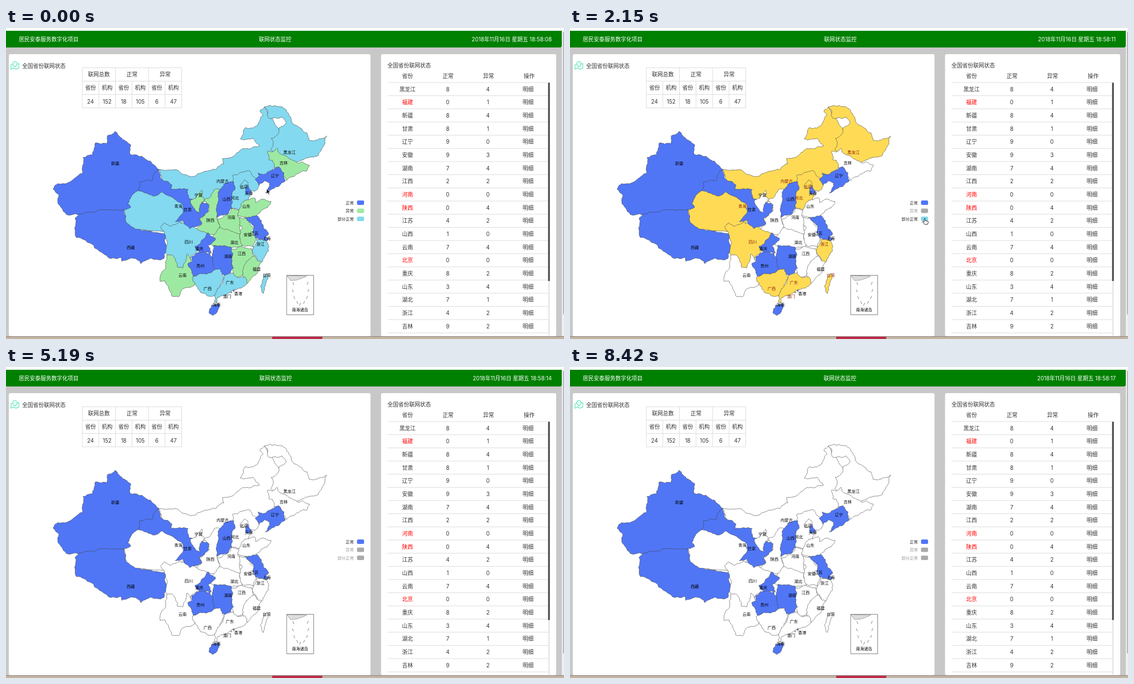
These frames come from a looping animation (1002x559 px, 8.52 s). An HTML page:

```html
<!DOCTYPE html>
<html lang="zh-CN">
<head>
<meta charset="utf-8">
<style>
html, body { margin: 0; width: 100%; height: 100%; overflow: hidden; background: #fff; }
body { position: relative; font: 9.75px Inter, "Noto Sans CJK SC", "Noto Sans CJK", sans-serif; }
svg { position: absolute; left: 0; top: 0; }
header { position: absolute; left: 0; top: 4.5px; width: 998px; height: 30px; padding: 0 18px 0 23px;
  box-sizing: border-box; display: flex; justify-content: space-between; align-items: center;
  color: #fff; background: #008000; border-radius: 0 0 3px 0; white-space: pre; }
</style>
</head>
<body>
<header><span>居民安泰服务数字化项目</span><span>联网状态监控</span><span id="clock"></span></header>
<svg id="stage" width="1002" height="559"></svg>
<script>
const NS = 'http://www.w3.org/2000/svg', stage = document.getElementById('stage');
const clock = document.getElementById('clock');
const LOOP = 8520, COLORS = ['#5076f6', '#9ee9a2', '#83d9ef'], YELLOW = '#ffdb55';

// Name, status, label place, then key points in degrees. Later shapes cover
// earlier ones, so each shared border is described once.
const provinces = `内蒙古 2 389,275 97.2,42.8 101.8,42.5 105,41.6 107.4,42.4 110.1,42.7 111.9,43.7 111.6,44.6 113.6,44.8 116.2,46.3 119.9,46.7 118.5,48 115.6,47.9 116.7,49.8 119.2,50.1 120.7,51.9 120,52.6 121,53.3 125,48.5 124,43.6 120.5,41 116.5,40.7 113.2,39.5 107.6,37.4 104.6,37.4 99,39.9
黑龙江 2 509,223 121.7,52.8 121,53.3 123.5,53.5 125.6,53 127.3,50.6 130.6,48.9 131,47.7 132.5,47.7 135,48.4 133.1,45.1 131,44.8 128,43.8 122.4,46.1 123,47 122.5,48 124.1,48.8 124.3,49.8 125.9,50.6 125,51.6 122,51.4
吉林 1 498.5,242 121.8,45.9 122.8,45.7 123.9,46.3 124.5,45.4 128.5,43.8 129.5,44.1 131.1,43.5 130.5,42.5 128.2,42 126,40.9 123.4,42.7 122.8,44.3 122,44.4
河北 2 411,305 114,40.7 113.9,41.8 116,42.3 117.5,42.6 118.2,41.9 119.2,41.3 119.8,40 118.9,39.1 117.7,39 117.8,38.3 115.4,36 113.5,36.2
辽宁 0 483,265 118.9,41.1 119.9,41.7 119.6,42.2 121.1,42 122.5,42.6 124.3,43.2 125.4,42.2 125.7,40.9 124.4,40 121.2,38.8 122.2,40.5 121,40.9 119.8,40.1
青海 2 309.5,320 89.8,38 93,39.5 98,39.3 103,37 103,34.5 100,32 90,33
新疆 0 196,243 73.6,39.4 74,40.1 76.5,40.4 80.2,42.1 80.3,44.8 82.5,45.2 83,47.2 85.6,47.1 85.7,48.4 87.5,49.2 88.6,48.2 91,46.9 90.8,45.4 93.5,45 95.4,44.2 97.2,42.8 95.9,41 92.6,39.2 91.2,38.4 90.2,37 91,36.4 89.5,36 82,35 76.5,35.2 74.6,37.2 74.9,38.4
西藏 0 224,394 78.5,34.5 79.5,35.3 84.3,36 89.5,36 90,33.8 93.4,32.5 98.8,32 99,29.1 98.5,27.8 95.3,27.8 93.3,26.9 91.6,27.8 89,27.3 88.8,28 86,27.9 82.1,30.3 78.8,31.3
四川 2 328,384 97.7,33.1 98.6,33.8 100,33.2 102,33.9 105.5,32.9 108.4,32 106,29 104.8,28.3 103.2,25.8 101,26 99.1,28.4 99.1,30 98.6,32.2
云南 1 317,444 99.1,28.3 100.2,28.4 101.5,26.3 102.7,26.2 103.6,28.5 104.5,27.5 106,24.5 105.3,23.3 102.4,22.5 101.7,21.3 100.2,21.5 98.7,24 97.6,23.9 97.7,25 98.7,26
甘肃 0 326,326 92.6,39.2 93,40.7 95.9,41 96.2,42 97.2,42.8 97.6,41.5 100.2,40.2 100,39.4 103.9,39.4 104,37.9 107.4,37.1 108.6,36.8 108.6,35.5 106.4,34.5 107,33.7 104.3,32.8 102.6,34.3 101,34 102.8,35.7 102.7,36.8 98,39 96.5,38.3
宁夏 1 345.5,300 106.9,39.3 106.9,38.2 107.6,37.7 106.5,36.7 106.6,35.5 105.5,35.9 104.4,37.5 105.6,37.9
河南 1 404.5,340 110.4,34.4 113.2,35.5 113.6,36.2 115.4,36 115,35 116.5,33.9 115.4,33.2 115.8,32 111,32.5
湖北 1 410,385 109.6,31.8 110.3,33 112.8,32.7 114,32.3 115.5,31.8 116,29.9 113.5,29.5 109.5,29.8 108.6,30.2
陕西 1 367,345 111,39.4 110.4,34.5 111,33.4 109.6,31.8 107.5,32.3 105.8,32.8 107,33.7 106.4,34.5 107.7,35.3 108.6,35.8 108.6,36.8 107.4,37.7 108.8,38.1 109.8,39.4
山西 0 396,307 111,39.4 111.9,40.3 114.1,40.7 114.4,39.4 113.6,38.4 113.7,36.3 112.7,35.2 110.3,34.7 110.5,37
山东 1 431.5,320 115,35 115.4,36.1 116.6,37.6 118.9,37.9 119,37.2 120.7,37.8 122.5,37.4 122.3,36.9 119.2,35.1 118.2,34.5 116.5,34.7
安徽 1 434,371 115.3,34.7 116.8,34.6 118.8,32.9 118.5,32 119.2,31.3 118.5,29.7 116,30 115.5,31.8 116,33 115.3,33.4
江苏 0 446,369 116.5,34.7 119.2,35 120.3,34.2 120.9,32.8 121.9,31.8 121,31 119,31.2 118.4,32.2 118.7,33 117.8,33.9
上海 0 468,378 121.2,31.6 121.9,31.2 121.7,30.8 121,30.9
浙江 2 457,388 119.4,31.1 121,30.9 122,29.9 121.9,29 120.5,27.2 119.6,27.2 118.2,29
江西 1 423,405 113.5,29.3 115.9,29.8 118.2,29.4 118.7,28 116.8,26 115.8,24.8 114.5,24.5 113.8,26.5
湖南 0 399,410 109.6,30 113.5,29.7 113.9,28.6 113.6,27 114.1,26.2 112.5,24.8 111.3,25.2 109.4,26.2 109.3,28.3
福建 1 450,433 116.1,25.8 117.5,27.6 118.8,28.2 119.7,27.3 120.4,27.2 119.6,25.5 118,24.4 117.2,23.6 116.2,24.8
广东 2 402,457 112.2,25 113.9,25.4 114.7,24.7 116.6,24.7 117.1,23.6 115.7,22.8 113.5,22.2 110.5,21.2 110.3,20.3 109.8,20.5 109.8,21.6
广西 2 362,468 104.8,24.6 107.2,25.4 111.2,26 112,24.5 111,23 109.8,21.5 108.2,21.5 106.7,22 105.6,23.3
贵州 0 349,427 103.8,26.9 104.8,27.3 104.7,28.1 107,29.1 108.8,28.7 109.6,26.8 109.5,25.7 107,25.2 105,24.8
重庆 0 347,396 108.4,32.1 110,31.2 108.4,29.9 109.1,28.7 106.5,28.8 105.4,29.8 106.5,30.2
北京 2 427,285.5 115.5,39.9 116.5,41 117.4,40.5 116.8,39.7 115.8,39.5
天津 0 436,297 116.8,39.3 117.4,40.2 118,39.2 117.6,38.6 116.8,38.7
台湾 2 468,444 121.5,25.3 121.9,25 121.3,23.3 120.8,21.9 120.1,23.1
海南 0 378,497 108.7,19.3 109.3,20 110.9,20.1 110.5,18.9 109.5,18.2 108.7,18.5
香港 0 417,477 113.9,22.4 114.3,22.5 114.2,22.2
澳门 2 397,482 113.4,22 113.6,22.2 113.7,22`.split('\n').map(row => {
  const [name, status, label, ...points] = row.split(' ');
  return { name, status: +status, label: pair(label), points: points.map(pair) };
});

const rows = `黑龙江 8 4,福建 0 1,新疆 8 4,甘肃 8 1,辽宁 9 0,安徽 9 3,湖南 7 4,江西 2 2,河南 0 0,陕西 0 4,
江苏 4 2,山西 1 0,云南 7 4,北京 0 0,重庆 8 2,山东 3 4,湖北 7 1,浙江 4 2,吉林 9 2`.split(',');

function pair(s) { return s.split(',').map(Number); }
function add(tag, attrs, parent = stage) {
  const el = document.createElementNS(NS, tag);
  for (const k in attrs) el.setAttribute(k, attrs[k]);
  parent.append(el);
  return el;
}
const rect = (x, y, width, height, fill, rx = 0, parent) =>
  add('rect', { x, y, width, height, fill, rx }, parent);
const line = (d, stroke = '#ddd', width = 1) =>
  add('path', { d, stroke, 'stroke-width': width, fill: 'none' });
function text(s, x, y, size = 9.75, fill = '#333', anchor = 'middle', parent) {
  const el = add('text', { x, y: y + size * .37, 'font-size': size, fill, 'text-anchor': anchor }, parent);
  el.textContent = s;
  return el;
}

const project = ([lon, lat]) => [8 * lon - 504, 711 - 10.68 * lat];

// Seeded midpoint displacement gives the borders their small wiggles.
function rough(pts, depth) {
  if (!depth) return pts;
  return rough(pts.flatMap(([x, y], i) => {
    const [u, v] = pts[(i + 1) % pts.length];
    const h = Math.sin((x + u) * 12.99 + (y + v) * 78.23) * 437.5;
    const k = (h - Math.floor(h) - .5) * Math.min(.35, 4 / Math.hypot(u - x, v - y));
    return [[x, y], [(x + u) / 2 - (v - y) * k, (y + v) / 2 + (u - x) * k]];
  }), depth - 1);
}
const outline = points => 'M' + rough(points.map(project), 3)
  .map(p => p.map(n => n.toFixed(1)).join()).join('L') + 'Z';

// Page
rect(0, 35, 998, 519, '#c8c8c8');
rect(998, 4, 4, 550, '#eee');
rect(1000, 7, 2, 508, '#bbb', 1);
rect(5, 47, 649.5, 507, '#fff', 3);
rect(673.5, 47, 314.5, 507, '#fff', 3);
rect(0, 554, 1002, 5, '#c3b4a2');
rect(478, 554, 90, 5, '#bd2b48');
rect(0, 554, 1002, 1, '#8d867f');

// Summary table
line('M12 65L9 66V74L13.5 72 18 74 23 72V64L20 65M16 70q-4-3-4-6a4 3.6 0 0 1 8 0q0 3-4 6ZM15 64h2', '#5ce6b4', 1.2);
text('全国省份联网状态', 29, 68, 9.75, '#333', 'start');
const [left, top0, cell, high] = [137, 71.5, 29.75, 24];
for (let i = 0; i < 4; i++) line(`M${left} ${top0 + i * high}h${cell * 6}`);
for (let i = 0; i < 7; i++) line(`M${left + i * cell} ${top0 + i % 2 * high}V${top0 + 3 * high}`);
['联网总数', '正常', '异常'].forEach((s, i) => text(s, left + (i * 2 + 1) * cell, 83.5));
[24, 152, 18, 105, 6, 47].forEach((n, i) => {
  const x = left + (i + .5) * cell;
  text(i % 2 ? '机构' : '省份', x, 107.5);
  text(n, x, 132);
});

// Detail table
text('全国省份联网状态', 685, 67, 9.75, '#333', 'start');
['省份', '正常', '异常', '操作'].forEach((s, i) => text(s, 721 + i * 72.8, 86.5));
rows.forEach((row, i) => {
  const cells = [...row.trim().split(' '), '明细'], y = 110 + i * 23.67;
  line(`M685 ${y - 12}H974`);
  cells.forEach((s, j) => text(s, 721 + j * 72.2, y, 9.75, !j && cells[1] === '0' ? '#f00' : '#333'));
});
line('M685 548H974');
rect(973.5, 98, 3, 455, '#e8e8e8');
rect(973.5, 98, 3, 357, '#444', 1.5);

// Map
const shapes = provinces.map(p => add('path', { d: outline(p.points), stroke: '#444', 'stroke-width': .6 }));
const labels = provinces.map(p => text(p.name, ...p.label, 7.3, '#000'));
add('path', { d: 'M504 444.5h48.5v71H504Z', fill: '#fff', stroke: '#777', 'stroke-width': .9 });
add('path', { d: 'M504 445L511 454 522 453 531 450 540 446Z', fill: '#ddd', stroke: '#777', 'stroke-width': .6 });
for (let i = 0; i < 9; i++) {
  const a = -.4 + i * .49;
  line(`M${529 + 15 * Math.cos(a)} ${467 + 27 * Math.sin(a)}l${i < 5 ? -2 : 2} 5`, '#777', .9);
}
text('南海诸岛', 528, 506, 7.3, '#000');

const legend = ['正常', '异常', '部分正常'].map((s, i) => {
  const y = 314 + i * 14.5;
  return [text(s, 624.5, y, 7.3, '#333', 'end'), rect(630.3, y - 4, 12.7, 8, '#aaa', 2)];
});

// Browser overlays
const tip = add('g'), status = add('g');
rect(59, -6, 124, 13.5, '#dcdcdc', 0, tip);
text('示例页面名称 - 某地信息实时联网平台', 121, 1.5, 6.8, '#333', 'middle', tip);
add('path', { d: 'M-1 542H330q2 0 2 2V554H-1Z', fill: '#fff', stroke: '#bbb', 'stroke-width': .8 }, status);
text('27.0.0.1:8088/map/#', 0, 548, 7.3, '#777', 'start', status);

const arrow = add('path', { d: 'M0 0V9.2L2.1 7.2 3.7 10.6 5.2 9.9 3.7 6.7H6.6Z', fill: '#000', stroke: '#fff', 'stroke-width': .7 });
const hand = add('path', { d: 'M-1 1q1-2 2 0V4.5l5 1q1 1 0 3L5 11H0L-4 6.5q1-1.5 3 .5Z', fill: '#fff', stroke: '#000', 'stroke-width': .8 });

// Pointer legs: start and end in ms, from, to, sag of the path
const legs = [
  [180, 1120, [468, 289], [648, 333], 65],
  [1290, 2150, [636, 329], [637, 342], 0],
  [2500, 2500, [428, 219], [428, 219], 0],
  [2740, 3120, [428, 219], [92, 0], 0],
  [6140, 6640, [120, 0], [473, 146], 0],
  [6790, 6990, [473, 146], [300, 0], 0]
];
function pointerAt(t) {
  const [from, to, a, b, sag] = legs.filter(l => t >= l[0]).pop() || legs[0];
  const p = to > from ? Math.min(1, Math.max(0, (t - from) / (to - from))) : 1;
  const e = p * p * (3 - 2 * p);
  return [a[0] + (b[0] - a[0]) * e, a[1] + (b[1] - a[1]) * e + sag * Math.sin(Math.PI * e)];
}
const show = (el, on) => el.setAttribute('visibility', on ? 'visible' : 'hidden');

function draw(t) {
  const within = (a, b) => t >= a && t < b;
  const hover = within(1290, 1790) ? 1 : within(2150, 2500) ? 2 : -1;
  const hidden = [false, t >= 1790, t >= 2500];
  const second = 9 + Math.floor((t - 175) / 985);
  clock.textContent = '2018年11月16日 星期五 18:58:' + String(second).padStart(2, '0');

  provinces.forEach(({ status: g }, i) => {
    shapes[i].setAttribute('fill', hidden[g] ? '#fff' : g === hover ? YELLOW : COLORS[g]);
    labels[i].setAttribute('fill', g === hover ? '#8b1a00' : '#000');
  });
  legend.forEach(([label, icon], g) => {
    label.setAttribute('fill', hidden[g] ? '#999' : '#222');
    icon.setAttribute('fill', hidden[g] ? '#aaa' : COLORS[g]);
  });

  const link = within(1290, 2500), [x, y] = pointerAt(t);
  for (const el of [arrow, hand]) el.setAttribute('transform', `translate(${x} ${y})`);
  show(arrow, !link && (t < 3120 || within(6140, 6990)));
  show(hand, link);
  show(tip, within(6390, 7200));
  show(status, within(6390, 7200));
}

const start = performance.now();
function frame() {
  draw((performance.now() - start) % LOOP);
  requestAnimationFrame(frame);
}
frame();
</script>
</body>
</html>
```
